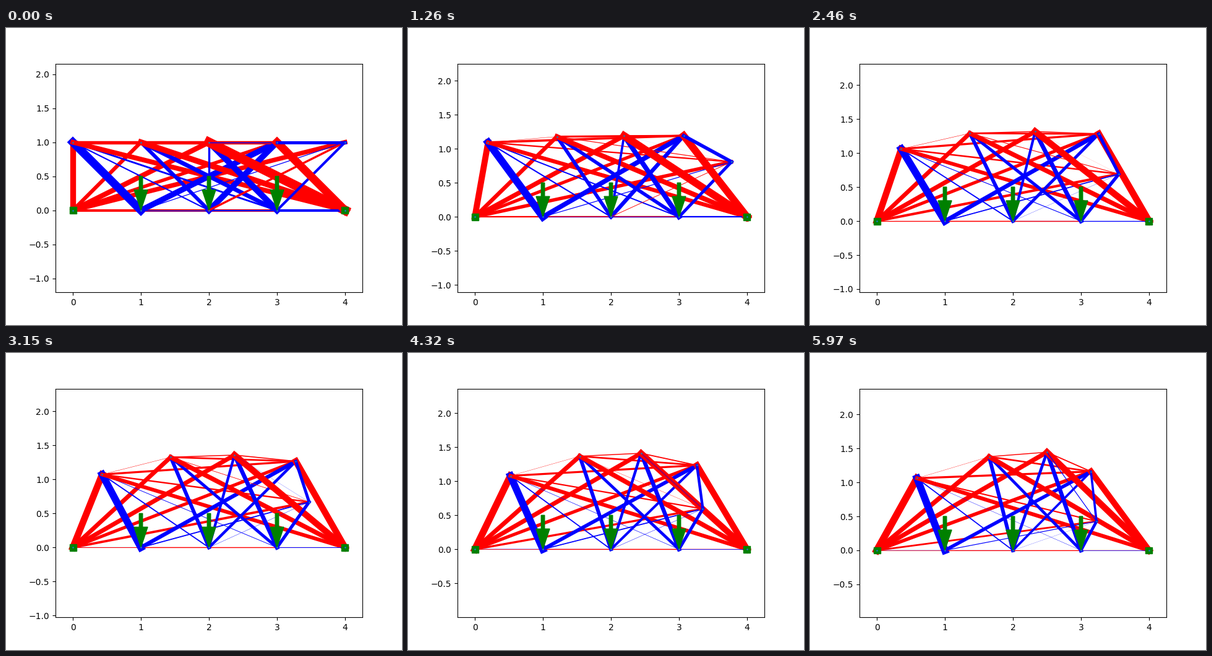
Write a matplotlib script that moves like this. It is 640 px wide and 480 px high and loops after 6 s.

```python
from itertools import combinations

import numpy as np
import matplotlib.pyplot as plt
from matplotlib.animation import FuncAnimation

FRAMES, INTERVAL = 200, 30
LOAD = 10.0

# Nodes are numbered column by column: even ones on the deck, odd ones on top.
COLUMNS = np.arange(5)
PINNED, LOADED = (0, 8), (2, 4, 6)
MISSING = {(1, 5), (2, 3), (2, 5), (6, 7), (8, 9)}
BARS = [b for b in combinations(range(10), 2) if b not in MISSING]

# Each top node starts at height 1 and glides through four points (x + iy).
STEPS = np.array([0, 23, 61, 124, 199])
PATHS = np.column_stack([COLUMNS + 1j, [
    [0.105 + 1.100j, 0.28 + 1.06j, 0.48 + 1.08j, 0.59 + 1.06j],
    [1.115 + 1.105j, 1.29 + 1.24j, 1.49 + 1.35j, 1.65 + 1.377j],
    [2.110 + 1.110j, 2.265 + 1.26j, 2.41 + 1.386j, 2.5 + 1.443j],
    [2.965 + 1.108j, 3.2 + 1.257j, 3.275 + 1.25j, 3.146 + 1.159j],
    [3.890 + 0.893j, 3.655 + 0.736j, 3.41 + 0.641j, 3.228 + 0.427j],
]])
SLOPES = np.gradient(PATHS, STEPS, axis=1, edge_order=2)


def nodes_at(t):
    """All node positions at step t, the top ones on a cubic Hermite curve."""
    k = min(np.searchsorted(STEPS, t, side="right"), len(STEPS) - 1)
    h = STEPS[k] - STEPS[k - 1]
    s = (t - STEPS[k - 1]) / h
    ease = s * s * (3 - 2 * s)
    top = (PATHS[:, k - 1] * (1 - ease) + PATHS[:, k] * ease
           + h * s * (1 - s) * (SLOPES[:, k - 1] * (1 - s) - SLOPES[:, k] * s))
    nodes = np.zeros((10, 2))
    nodes[::2, 0] = COLUMNS
    nodes[1::2] = np.column_stack([top.real, top.imag])
    return nodes


def bar_forces(nodes):
    """Axial force in each bar, all bars equally stiff; tension is positive."""
    stretch = np.zeros((len(BARS), 20))
    for row, (i, j) in zip(stretch, BARS):
        d = nodes[j] - nodes[i]
        d /= np.hypot(*d)
        row[2 * i:2 * i + 2] = -d
        row[2 * j:2 * j + 2] = d
    free = [k for k in range(20) if k // 2 not in PINNED]
    load = np.zeros(20)
    load[[2 * n + 1 for n in LOADED]] = -LOAD
    b = stretch[:, free]
    return b @ np.linalg.lstsq(b.T @ b, load[free], rcond=None)[0]


fig, ax = plt.subplots(figsize=(6.4, 4.8), dpi=100)
ax.set_xlim(-0.255, 4.255)
Y_SPAN = 4.51 * 369.6 / 496

start = nodes_at(0)
lines = [ax.plot([], [], zorder=2)[0] for _ in BARS]
for x, y in start[list(PINNED)]:
    ax.add_patch(plt.Rectangle((x - 0.05, y - 0.05), 0.1, 0.1,
                               color="green", zorder=3))
for x, y in start[list(LOADED)]:
    ax.arrow(x, y + 0.5, 0, -0.5, width=0.05, head_width=0.2,
             length_includes_head=True, color="green", zorder=3)
dots = ax.scatter(*start.T, s=1, zorder=4)


def update(t):
    nodes = nodes_at(t)
    for line, bar, f in zip(lines, BARS, bar_forces(nodes)):
        line.set_data(*nodes[list(bar)].T)
        line.set_linewidth(abs(f))
        line.set_color("blue" if f > 0 else "red")
    dots.set_offsets(nodes)
    mid = (nodes[:, 1].max() - 0.05) / 2
    ax.set_ylim(mid - Y_SPAN / 2, mid + Y_SPAN / 2)
    return lines


anim = FuncAnimation(fig, update, frames=FRAMES, interval=INTERVAL,
                     repeat=True, repeat_delay=0, blit=False)
plt.show()
```
